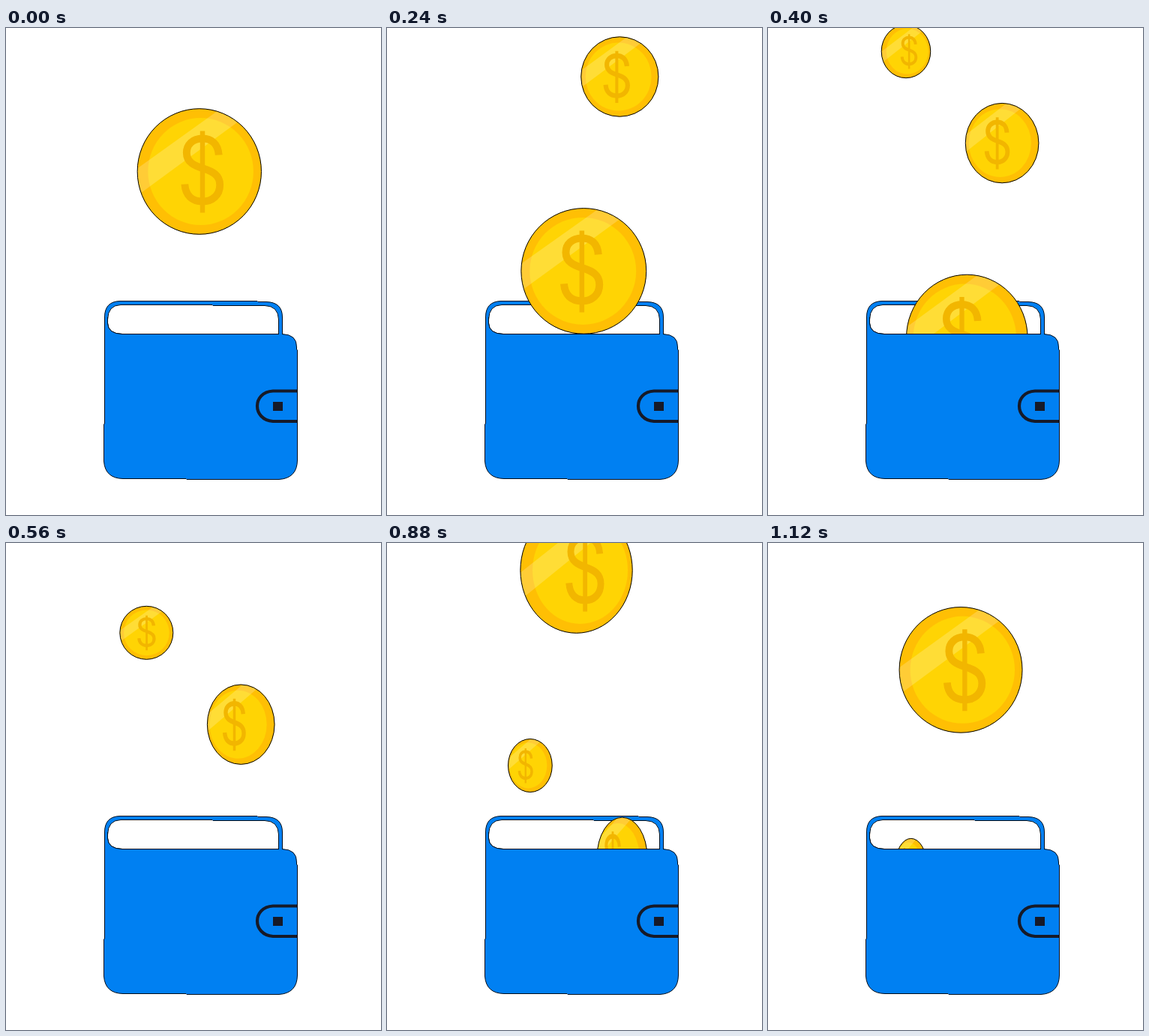
An HTML page with a canvas that plays this animation: 500 by 650 pixels, repeating every 1.16 s.

```html
<!DOCTYPE html>
<html lang="en">
<head>
<meta charset="utf-8">
<title>Coins falling into a wallet</title>
<style>
  html, body { margin: 0; width: 100%; height: 100%; overflow: hidden; background: #fff; }
  canvas { display: block; }
</style>
</head>
<body>
<canvas id="stage" width="500" height="650"></canvas>
<script>
const ctx = document.getElementById('stage').getContext('2d');
const STEP = 40, STEPS = 29, FALL = 22.15, RIM = 408.5;
const BLUE = '#0080f2', INK = '#161a28';

// Wallet pieces
const back = new Path2D('M131.5 412V386Q131.5 365 152 364.5H335L336 365.5H347Q368.5 366 368.5 386V412Z');
const pocket = new Path2D('M135.5 389Q136 370 153 369.5H275L276 370.5H345Q363 371 363.5 389V408.5H155Q136 408 135.5 394Z');
const front = new Path2D('M131.5 386V528L130.5 529V578Q132 601 156 601.5H240L241 602.5H364Q388 601 388.5 577V430L387.5 429V426Q388 409 368 408.5H155Q136 408 135.5 394V386Z');
const clasp = new Path2D('M388.5 484.5H356C328 486 328 523 356 525H388.5');

// Dollar sign, drawn for the largest coin
const dollarCurve = new Path2D('M22 -22C21 -37 12 -44 0 -44C-13 -44 -21.5 -36 -21.5 -25C-21.5 -12 -11 -8 1 -4C14 0 23.5 5 23.5 18C23.5 32 13 40 0 40C-14 40 -23 32 -24 17');
const dollarBar = new Path2D('M0 -54V55');
const sheen = new Path2D('M-130 25L34 -91L73 -85L-130 62Z');

// Each coin: radius, step at which it is at height y, sway and turn (degrees) per step
const coins = [
  { r: 84, at: 0, y: 191.5, first: -9,
    x: i => 257.8 + 0.75 * i,
    turn: i => 2.5 * (i - 3.8) },
  { r: 53.4, at: 6, y: 65, first: 0,
    x: i => 313.7 - 0.02 * (i - 19) ** 2,
    turn: i => 2.3 * i + 0.3 },
  { r: 35.7, at: 14, y: 119.8, first: 0,
    x: i => 191.1 - 0.033 * (i - 24.7) ** 2,
    turn: i => 17.8 + 4.4 * (i - 18) - 0.08 * (i - 18) ** 2 }
];

function ellipse(x, rx, ry) {
  ctx.beginPath();
  ctx.ellipse(x, 0, rx, ry, 0, 0, 2 * Math.PI);
}

// Draws on the coin's turned face, shifted sideways
function onFace(shift, cos, paintFace) {
  ctx.save();
  ctx.translate(shift, 0);
  ctx.scale(cos, 1);
  paintFace();
  ctx.restore();
}

function drawCoin(coin, step) {
  const i = step >= STEPS + coin.first ? step - STEPS : step;
  const angle = coin.turn(i) * Math.PI / 180;
  const sin = Math.sin(angle), cos = Math.cos(angle);
  const k = coin.r / 84;

  ctx.save();
  ctx.translate(coin.x(i), coin.y + FALL * (i - coin.at));

  ellipse(0, coin.r * cos, coin.r);
  ctx.fillStyle = '#ffbf04';
  ctx.fill();
  ctx.save();
  ctx.clip();
  ctx.scale(k, k);

  ellipse(-11 * sin, 71.3 * cos, 71.5);
  ctx.fillStyle = '#ffd404';
  ctx.fill();

  onFace(-30 * sin, cos, () => {
    ctx.fillStyle = 'rgba(255,255,255,.2)';
    ctx.fill(sheen);
  });
  onFace(-25.5 * sin, cos, () => {
    ctx.strokeStyle = '#f2b600';
    ctx.lineWidth = 10;
    ctx.stroke(dollarCurve);
    ctx.lineWidth = 6.5;
    ctx.stroke(dollarBar);
  });
  ctx.restore();

  ellipse(0, coin.r * cos - 0.2, coin.r - 0.2);
  ctx.strokeStyle = '#000';
  ctx.lineWidth = 1;
  ctx.stroke();
  ctx.restore();
}

function paint(path, fill) {
  ctx.fillStyle = fill;
  ctx.fill(path);
  ctx.strokeStyle = '#000c18';
  ctx.lineWidth = 1;
  ctx.stroke(path);
}

function draw() {
  const step = Math.floor(performance.now() / STEP) % STEPS;
  ctx.fillStyle = '#fff';
  ctx.fillRect(0, 0, 500, 650);

  paint(back, BLUE);
  paint(pocket, '#fff');

  ctx.save();
  ctx.beginPath();
  ctx.rect(0, 0, 500, RIM);
  ctx.clip();
  for (const coin of coins) drawCoin(coin, step);
  ctx.restore();

  paint(front, BLUE);
  // Join the band and the left side to the front
  ctx.fillStyle = BLUE;
  ctx.fillRect(364, 404, 4, 7);
  ctx.fillRect(132, 384, 3, 5);

  ctx.strokeStyle = INK;
  ctx.lineWidth = 4.2;
  ctx.stroke(clasp);
  ctx.fillStyle = INK;
  ctx.fillRect(356, 499, 13, 12);

  requestAnimationFrame(draw);
}
draw();
</script>
</body>
</html>
```
